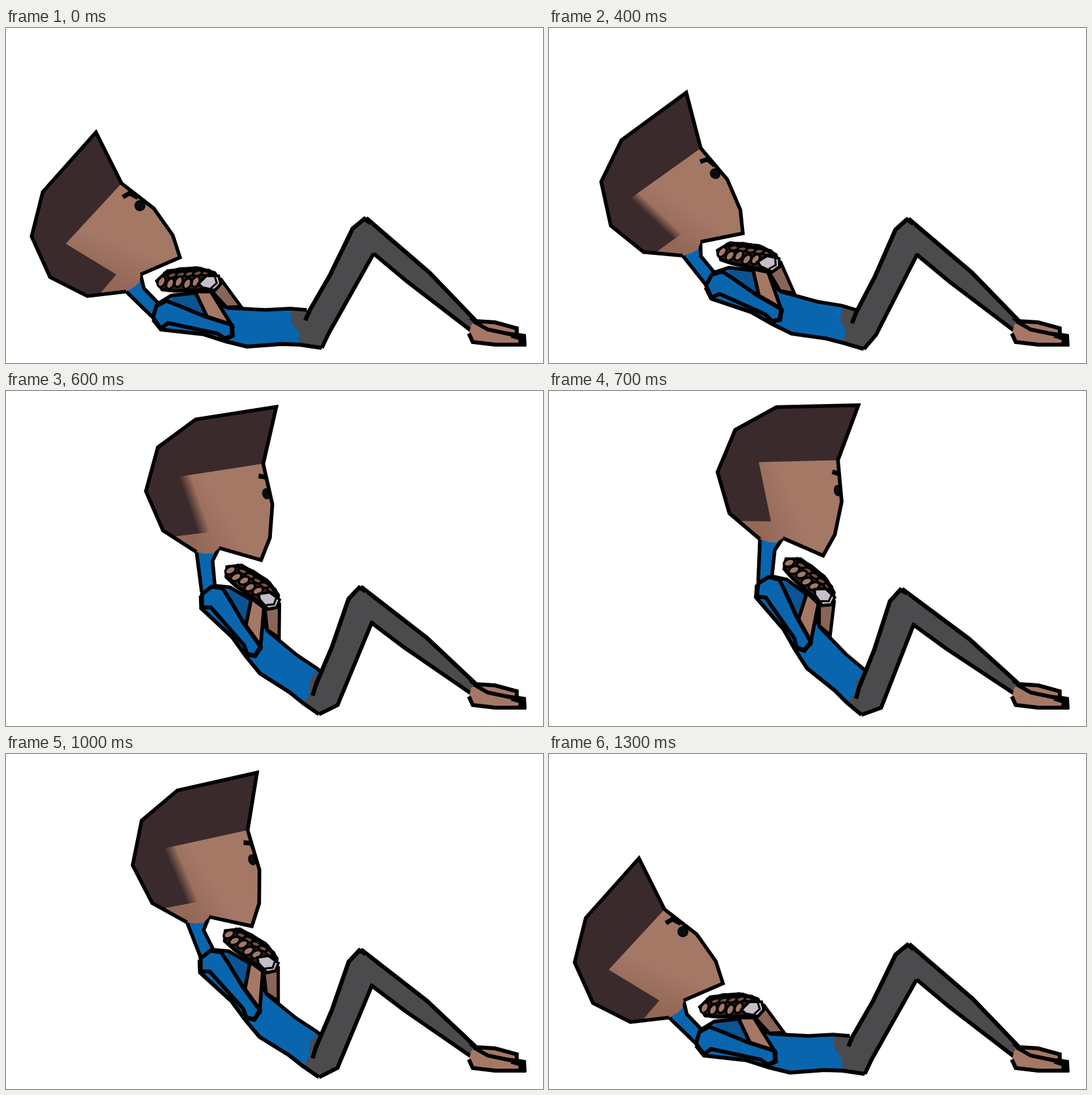
These frames come from a looping animation (818 px wide and 511 px high, 1400 ms). An HTML page with a canvas:

```html
<!DOCTYPE html>
<html lang="en">
<head>
<meta charset="utf-8">
<title>Sit-up</title>
<style>
  html, body { margin: 0; width: 100%; height: 100%; overflow: hidden; background: #fff; }
  canvas { display: block; }
</style>
</head>
<body>
<canvas id="stage" width="818" height="511"></canvas>
<script>
const ctx = document.getElementById('stage').getContext('2d');
const HAIR = '#3a2a2c', SKIN = '#a57866', BLUE = '#0966ae', CHEST = '#0a5493', GREY = '#4b4b4e', INK = '#000';
const STEP = 100, STEPS = 14;

// All shapes are given in the lying pose; each body part then turns about a pivot.
const skull = [[183,402], [124,409], [67,380], [39,318], [56,250], [137,159], [176,237], [225,275], [254,316], [265,350], [205,376]];
const front = [[232,420], [252,408], [290,404], [338,427], [395,430], [433,428], [458,430]];
const back = [[224,445], [236,460], [300,467], [335,478], [367,486], [420,482], [447,483]];
const waist = [[433,428], [435,450], [446,464], [447,483]];
const sleeve = [[224,442], [229,424], [244,416], [262,423], [303,440], [344,453], [345,469], [334,474], [322,466], [247,450], [236,458]];
const shin = [[551,292], [645,373], [715,446]];
const calf = [[709,462], [610,386], [560,344]];
const thighFront = [[456,446], [463,430], [494,376], [528,306], [546,291], [556,298]];
const thighBack = [[560,344], [492,465]];
const jaw = [205,376], nape = [183,402];

const clamp = x => Math.min(1, Math.max(0, x));
const smooth = x => x * x * (3 - 2 * x);

// Rise over steps 1 to 7, rest, then sink over steps 8 to 13.
function lift(step, risePower, sinkPower) {
  return smooth(clamp((step - 1) / 6) ** risePower) - smooth(clamp((step - 8) / 5) ** sinkPower);
}
const bodyLift = step => lift(step, 1.5, 1.5);
const headLift = step => lift(step, 1.6, 1.25);

const pin = (x, y, deg) => new DOMMatrix().translate(x, y).rotate(deg).translate(-x, -y);

function move(matrix, points) {
  return points.map(([x, y]) => {
    const p = matrix.transformPoint({ x, y });
    return [p.x, p.y];
  });
}

function trace(points, closed) {
  ctx.beginPath();
  points.forEach(p => ctx.lineTo(...p));
  if (closed) ctx.closePath();
}

function fill(points, color) {
  trace(points, true);
  ctx.fillStyle = color;
  ctx.fill();
}

function line(points, width = 5.5, closed = false) {
  trace(points, closed);
  ctx.lineWidth = width;
  ctx.strokeStyle = INK;
  ctx.stroke();
}

function shape(points, color, width) {
  fill(points, color);
  line(points, width, true);
}

function blob(x, y, rx, ry, tilt, color, border = 0) {
  ctx.beginPath();
  ctx.ellipse(x, y, rx, ry, tilt, 0, 2 * Math.PI);
  ctx.fillStyle = color;
  ctx.fill();
  ctx.lineWidth = border;
  ctx.strokeStyle = INK;
  if (border) ctx.stroke();
}

function within(matrix, paint) {
  ctx.save();
  ctx.setTransform(matrix);
  paint();
  ctx.restore();
}

function drawFeet() {
  shape([[714,447], [745,449], [778,458], [778,468], [735,463]], SKIN, 6);
  fill([[709,452], [716,449], [736,460], [784,471], [789,484], [712,480], [705,467]], SKIN);
  line([[713,448], [734,460], [787,471], [789,483], [745,483], [711,479], [705,466]], 6);
  fill([[768,472], [780,465], [792,467], [793,485], [779,486], [781,476]], INK);
}

function drawArms() {
  shape([[312,400], [328,384], [358,425], [336,426]], '#8a6458', 5);
  shape([[288,402], [312,402], [343,452], [306,440]], SKIN);
  shape(sleeve, BLUE, 6);
  line([[344,453], [345,469], [334,474]], 7);
}

function drawHand() {
  shape([[230,386], [246,371], [290,366], [318,374], [327,390], [318,400], [290,400], [257,401], [238,399]], '#33221e');
  for (let i = 0; i < 5; i++) blob(253 + i * 13, 377 - i, 7, 4, -.3, '#74503f', 3.5);
  for (let i = 0; i < 5; i++) blob(237 + i * 13, 387 + i % 2 * 3, 5.5, 8.5, .45, SKIN, 3.5);
  line([[240,375], [265,368], [295,367], [318,374]], 6);
  shape([[293,390], [305,378], [324,378], [327,390], [318,400], [299,396]], '#c5bfc9', 4);
  line([[318,379], [321,389], [312,397]], 3);
}

function drawHead(h, smear) {
  fill([...skull, [202,388]], HAIR);
  ctx.save();
  trace([...skull, [203,388], [186,404]], true);
  ctx.clip();

  const tone = ctx.createLinearGradient(212, 342, 190, 398);
  tone.addColorStop(0, SKIN);
  tone.addColorStop(1, '#936856');

  // Layered skin softens the sideburn while the head moves fast.
  const layers = smear > 1 ? 8 : 1;
  for (let i = 0; i < layers; i++) {
    const d = layers > 1 ? smear * (.5 - i / (layers - 1)) : 0;
    const dx = 7 * h - .68 * d, dy = .73 * d - 4 * h;
    ctx.globalAlpha = 1 / (layers - i);
    fill([skull[6], [91 + dx, 329 + dy], [168 + dx, 376 + dy], [145,403], [143,412], nape, [205,390], ...skull.slice(7).reverse()], tone);
  }
  ctx.globalAlpha = 1;

  // The face turns slightly away, so its features near the edge.
  ctx.translate(5 * h, -3 * h);
  line([[178,258], [188,252], [201,259]], 7);
  blob(204, 271, 8.5 - 2.5 * h, 8.5, -.91, '#080d0e');
  ctx.restore();
  line(skull);
}

function draw(step) {
  const b = bodyLift(step), h = headLift(step);
  const speed = Math.abs(headLift(step + .5) - headLift(step - .5));
  const grow = 1 + .025 * h;

  const torso = pin(460, 488, 43 * b);
  const head = pin(455, 474, 47 * h).translate(...jaw).scale(grow).translate(-jaw[0], -jaw[1]);
  const lowerLeg = pin(712, 453, -4 * b * b);
  const thigh = lowerLeg.multiply(pin(550, 291, 4 * b * b - 8 * b));

  const hip = [481 - 5 * b, 488 + 6 * b];
  const chestLine = move(torso, front), backLine = [...move(torso, back), hip];
  const thighLine = move(thigh, thighFront), seat = [...move(thigh, thighBack), hip];
  const neckBack = move(head, [nape]), neckFront = move(head, [jaw, [210,397]]);

  ctx.fillStyle = '#fff';
  ctx.fillRect(0, 0, 818, 511);

  fill([...neckBack, ...neckFront, chestLine[0], backLine[0]], BLUE);
  fill([...chestLine, ...backLine.slice().reverse()], BLUE);
  fill(move(torso, [[250,410], [288,404], [303,440], [262,424]]), CHEST);
  fill([...move(torso, waist), hip, thighLine[2], thighLine[1]], GREY);
  line(chestLine);

  within(lowerLeg, () => {
    fill([[536,312], ...shin, ...calf], GREY);
    line([[547,296], ...shin], 6.5);
    line(calf, 6);
  });
  fill([...thighLine, ...seat], GREY);
  line(thighLine, 6.5);
  line(seat, 6);
  line(backLine, 6);
  drawFeet();

  line([...neckBack, ...move(torso, [[222,440]])]);
  line([...neckFront, chestLine[0]]);
  within(head, () => drawHead(h, Math.max(0, speed - .1) * 100));
  within(torso, () => {
    drawArms();
    drawHand();
  });
}

ctx.miterLimit = 4;
const start = performance.now();
let shown = -1;

function tick() {
  const step = Math.floor((performance.now() - start) / STEP) % STEPS;
  if (step !== shown) draw(shown = step);
  requestAnimationFrame(tick);
}
tick();
</script>
</body>
</html>
```
